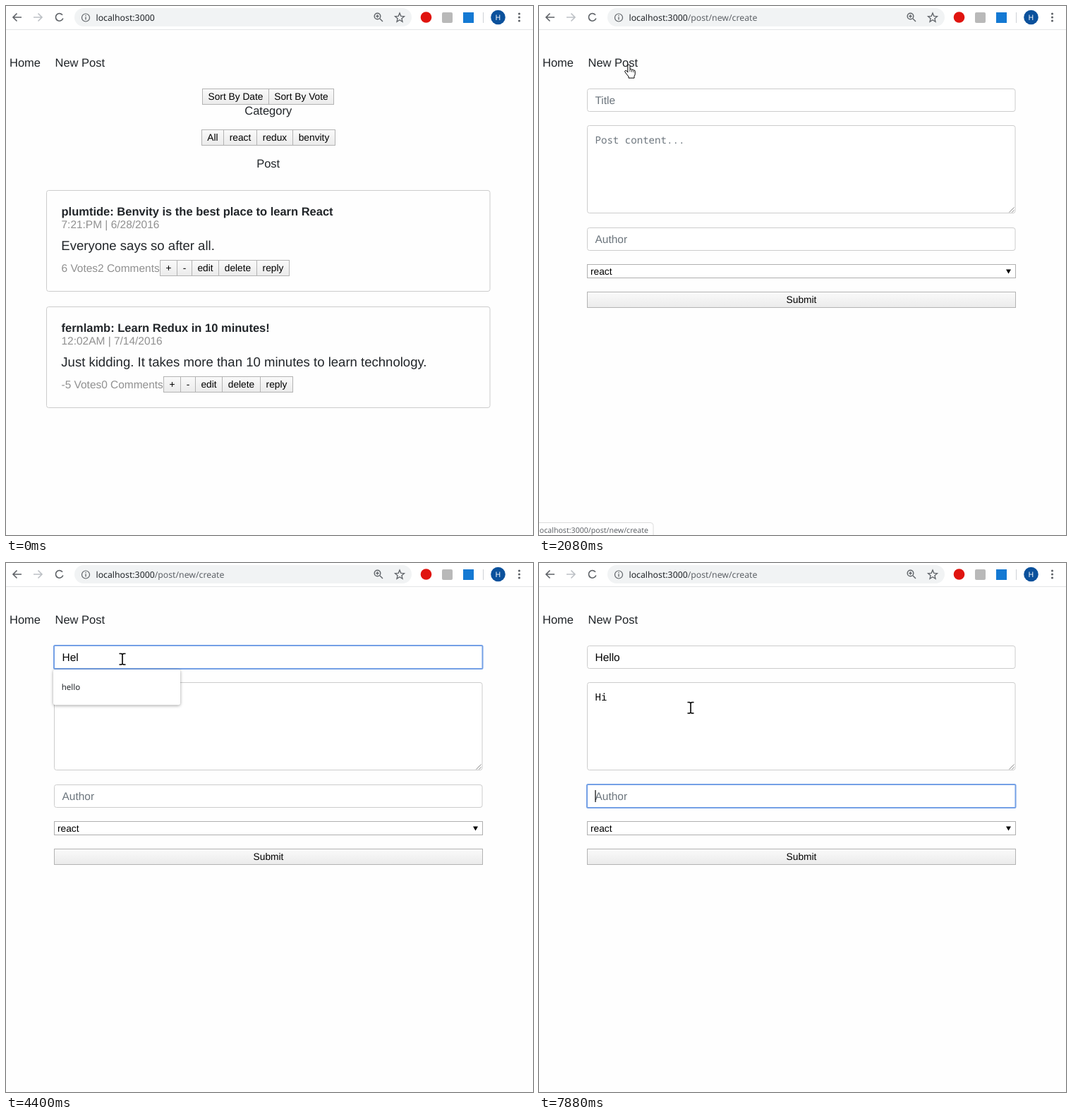
Write an HTML page that moves like this. It is 747x750 px and loops after 8 s.

```html
<!DOCTYPE html>
<html lang="en">
<head>
<meta charset="utf-8">
<title>New post</title>
<style>
  html, body { margin: 0; width: 100%; height: 100%; overflow: hidden; background: #fefefe; }
  svg { display: block; width: 100%; height: 100%; }
  text { font-family: "Liberation Sans", Arial, sans-serif; fill: #212529; text-rendering: geometricPrecision; white-space: pre; }
  .mid { text-anchor: middle; }
  .bold { font-weight: 700; }
  .meta { fill: #909090; }
  .dark { fill: #000; }
  .hint { fill: #6c757d; }
  .mono { font-family: "Noto Sans Mono", monospace; }
  .ui { font-family: "Noto Sans", sans-serif; }
  .path { fill: #5f6368; }
  .item { font-weight: 500; }
  .line { fill: none; stroke: #5f6368; stroke-width: 1.6; }
  .panel { fill: #fff; filter: drop-shadow(0 1px 2px rgba(0, 0, 0, .38)); }
</style>
</head>
<body>
<svg viewBox="0 0 747 750" xmlns="http://www.w3.org/2000/svg">
  <defs>
    <linearGradient id="face" x2="0" y2="1">
      <stop offset="0" stop-color="#fafafa"/><stop offset="1" stop-color="#ebebeb"/>
    </linearGradient>
  </defs>
  <rect width="747" height="33" fill="#fff"/>
  <path d="M0 33.5H747" stroke="#e3e5e7"/>
  <rect x="97" y="3" width="478" height="26" rx="13" fill="#f1f3f4"/>
  <g class="line">
    <path d="M22 16H10M15.500 10.500L10 16l5.500 5.500"/>
    <path d="M39 16H51M45.500 10.500L51 16l-5.500 5.500" stroke="#bdc1c6"/>
    <path d="M80 12.700A5.300 5.300 0 1 0 80.800 17.500"/>
    <circle cx="113" cy="16.500" r="5.500" stroke-width="1.200"/>
    <path d="M113 15.500v4M113 13v1.300" stroke-width="1.300"/>
    <circle cx="526.500" cy="14.500" r="4.300" stroke-width="1.400"/>
    <path d="M530 18l4 4M524.300 14.500h4.400M526.500 12.300v4.400" stroke-width="1.400"/>
    <path d="M558 10l1.800 4.300 4.700.4-3.600 3 1.100 4.600-4-2.500-4 2.500 1.100-4.600-3.600-3 4.700-.4z" stroke-width="1.300"/>
    <path d="M676.500 9v15" stroke="#cfd2d6" stroke-width="1"/>
  </g>
  <circle cx="595.500" cy="16" r="7.800" fill="#e0140f"/>
  <rect x="618" y="9" width="15" height="15" rx="2" fill="#b9b9b9"/>
  <rect x="648" y="9" width="15" height="15" fill="#1479d3"/>
  <circle cx="697.500" cy="16" r="10.300" fill="#0b519c"/>
  <text class="ui mid" x="697.500" y="19.800" font-size="10.500" style="fill:#fff">H</text>
  <g fill="#5f6368"><circle cx="727.500" cy="11" r="1.600"/><circle cx="727.500" cy="16" r="1.600"/><circle cx="727.500" cy="21" r="1.600"/></g>
  <text x="5" y="85.500" font-size="16.500">Home</text>
  <text x="69.500" y="85.500" font-size="16.500">New Post</text>
  <g id="page"></g>
  <g id="pointer" stroke="#000" fill="#fff"></g>
</svg>
<script>
const LOOP = 8000, PAGE_CHANGE = 2080;
const page = document.getElementById('page');
const pointer = document.getElementById('pointer');

const text = (x, y, size, string, cls = '') =>
  `<text x="${x}" y="${y}" font-size="${size}" class="${cls}">${string}</text>`;

const box = (x, y, right, bottom, rx, stroke, fill = '#fff', width = 1) =>
  `<rect x="${x}" y="${y}" width="${right - x}" height="${bottom - y}" rx="${rx}" stroke="${stroke}" stroke-width="${width}" fill="${fill}"/>`;

// Adjacent buttons share their edges.
const buttons = (y, edges, labels) => labels.map((label, i) =>
  box(edges[i] + .5, y + .5, edges[i + 1] + .5, y + 22.5, 0, '#b3b3b3', 'url(#face)') +
  text((edges[i] + edges[i + 1] + 1) / 2, y + 15.5, 13.75, label, 'mid dark')).join('');

const card = (y, title, date, body, votes, left) =>
  box(57.5, y + .5, 686, y + 143.5, 3, '#ccc', 'none') +
  text(78.5, y + 35.5, 16.5, title, 'bold') +
  text(78.5, y + 54, 15.46, date, 'meta') +
  text(78.3, y + 85, 18.56, body) +
  text(78.5, y + 115.5, 15.46, votes, 'meta') +
  buttons(y + 99, [0, 24, 45, 83, 137, 183].map(x => x + left), ['+', '-', 'edit', 'delete', 'reply']);

const address = path => text(127.5, 21, 12.27,
  `localhost:3000<tspan class="path">${path}</tspan>`, 'ui');

const listPage = address('') +
  buttons(117, [278, 372, 464], ['Sort By Date', 'Sort By Vote']) +
  text(371.7, 154, 16.5, 'Category', 'mid') +
  buttons(175, [277, 308, 355, 406, 466], ['All', 'react', 'redux', 'benvity']) +
  text(371.7, 229, 16.5, 'Post', 'mid') +
  card(261, 'plumtide: Benvity is the best place to learn React', '7:21:PM | 6/28/2016',
    'Everyone says so after all.', '6 Votes2 Comments', 218) +
  card(426, 'fernlamb: Learn Redux in 10 minutes!', '12:02AM | 7/14/2016',
    'Just kidding. It takes more than 10 minutes to learn technology.', '-5 Votes0 Comments', 223);

const status = '<path d="M-1 732.500H158q4 0 4 4V751H-1z" fill="#fff" stroke="#dcdcdc"/>' +
  text(-2, 747, 10.6, 'localhost:3000/post/new/create', 'ui path');

// Last value whose start time has passed.
const at = (t, steps) => steps.filter(step => step[0] <= t).pop()[1];

const suggestions = {
  all: [247, ['Betrayal', 'dd', 'Ward', 'aut', 'cc', 'ff']],
  wide: [494, ['hello', 'hi', 'hey', 'how to write a short post that many people would enjoy reading', 'home', 'hh']],
  one: [247, ['hello']]
};

const panel = name => {
  if (!name) return '';
  const [right, items] = suggestions[name];
  const height = 16.5 + items.length * 33.7;
  return `<rect class="panel" x="67" y="151" width="${right - 67}" height="${height}" rx="3"/>` +
    items.map((item, i) => text(78.7, 179.7 + i * 33.7, 11.5, item, 'ui item')).join('');
};

const fields = {
  title: { top: 117, bottom: 149, caret: [125, 142] },
  body: { top: 169, bottom: 293, caret: [181, 198] },
  author: { top: 314, bottom: 346, caret: [322, 339] }
};

function formPage(t) {
  const title = at(t, [[0, ''], [3320, 'H'], [3790, 'He'], [3940, 'Hel'], [4870, 'Hello']]);
  const body = at(t, [[0, ''], [7100, 'H'], [7420, 'Hi'], [7650, 'Hi ']]);
  const focus = at(t, [[0, ''], [2450, 'title'], [4950, 'body'], [5490, 'author'], [6180, 'body'], [7880, 'author']]);
  const open = at(t, [[0, ''], [2450, 'all'], [3420, 'wide'], [3860, 'one'], [4870, '']]);
  const blinkOff = at(t, [[0, 0], [3000, 1], [3320, 0], [4400, 1], [4870, 0], [6640, 1], [7100, 0]]);

  let out = address('/post/new/create');
  for (const [name, f] of Object.entries(fields)) {
    out += name === focus
      ? box(68, f.top, 675.5, f.bottom + 1, 1.5, '#74a0e6', '#fff', 2)
      : box(68.5, f.top + .5, 675, f.bottom + .5, 3, '#ccc');
  }
  out += '<path d="M666.500 292.500l7-7M670.500 292.500l3-3" stroke="#888"/>' +
    text(79.5, 138.7, 15.46, title || 'Title', title ? 'dark' : 'hint') +
    text(79.5, 194.7, 14.1, body || 'Post content...', body ? 'mono dark' : 'mono hint') +
    text(79.5, 335.8, 15.46, 'Author', 'hint') +
    box(68.5, 366.5, 675.5, 385.5, 0, '#b0b0b0') +
    text(73, 380.8, 13.75, 'react', 'dark') +
    '<path d="M662 373.500h7l-3.500 6z"/>' +
    buttons(405, [68, 675], ['Submit']) + panel(open);

  if (focus && !blinkOff) {
    const x = focus === 'title' ? [80, 91, 99, 102, 115][title.length]
      : focus === 'body' ? 80 + Math.round(body.length * 8.2) : 80;
    const [top, bottom] = fields[focus].caret;
    out += `<path d="M${x} ${top}V${bottom}" stroke="#000" stroke-width="1.200"/>`;
  }
  return out;
}

const shapes = {
  arrow: '<path d="M.5.5v16l3.700-3.500 2.600 6 2.300-1-2.600-5.800h5.200z"/>',
  hand: '<path d="M-1.600 11V1.600q0-1.600 1.600-1.600t1.600 1.600v5q2.200-1 2.500.7 2-.8 2.500.7 2.200-.6 2.200 1.400v4q0 1.500-1.200 3v2.600h-8v-2q-2.500-3-5-6.300-1-2 .8-2.400 1.400 0 3 2.300z"/>' +
    '<path d="M1.600 6.500v3.500M4.100 7.500v3M6.600 8.500v2.500" fill="none" stroke-width=".8"/>',
  beam: '<path d="M-4.500-7.500h3l1.500 1 1.500-1h3M-4.500 8h3l1.500-1 1.500 1h3M0-6.500V7" fill="none" stroke-width="1.600"/>'
};

// Pointer moves in sampled steps: start, end, number of steps, destination.
const moves = [
  [290, 520, 4, 410, 533],
  [670, 1300, 9, 69, 82],
  [1370, 1450, 2, 71, 81],
  [1530, 1860, 5, 123, 77],
  [2080, 2370, 5, 165, 136],
  [5950, 6180, 4, 215, 205]
];

function pointerAt(t) {
  let x = 650, y = 742;
  for (const [start, end, count, toX, toY] of moves) {
    if (t < start) break;
    const step = Math.min(count, 1 + Math.floor((t - start) / (end - start) * (count - 1) + 1e-6));
    const p = step / count, ease = p * p * (3 - 2 * p);
    x += (toX - x) * ease;
    y += (toY - y) * ease;
  }
  return [x, y];
}

function setMarkup(node, markup) {
  if (node.markup !== markup) node.innerHTML = node.markup = markup;
}

function draw(t) {
  setMarkup(page, (t < PAGE_CHANGE ? listPage : formPage(t)) + (t >= 1220 && t < 2370 ? status : ''));
  const [x, y] = pointerAt(t);
  const overLink = y < 92 && x < 145;
  const shape = overLink ? 'hand' : t >= PAGE_CHANGE && y > 116 ? 'beam' : 'arrow';
  setMarkup(pointer, t < 290 ? '' : shapes[shape]);
  pointer.setAttribute('transform', `translate(${x.toFixed(1)} ${y.toFixed(1)})`);
}

function tick() {
  draw(performance.now() % LOOP);
  requestAnimationFrame(tick);
}
tick();
</script>
</body>
</html>
```
